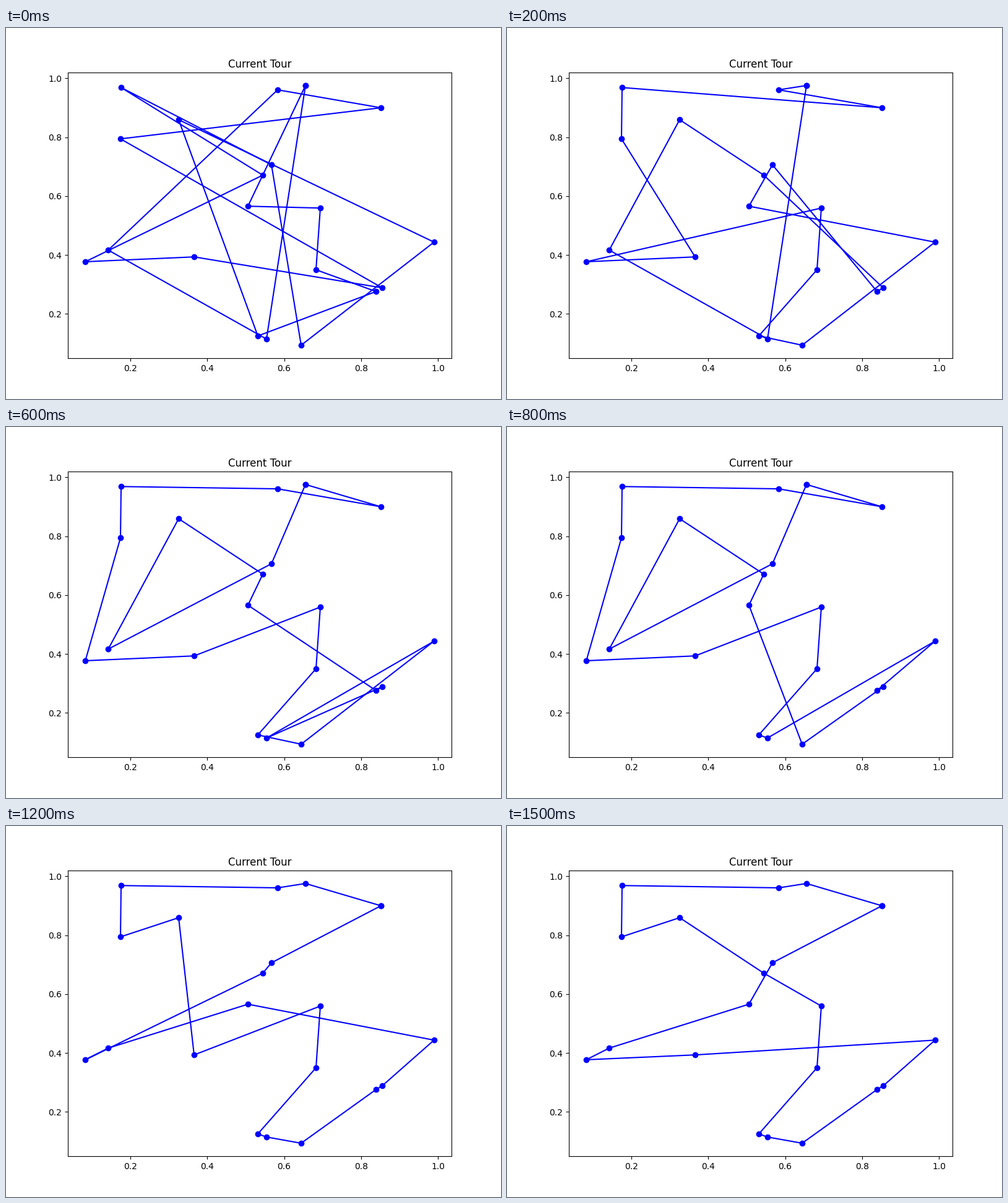
Write a matplotlib script that moves like this. It is 800 px wide and 600 px high and loops after 1.6 s.

```python
import numpy as np
import matplotlib.pyplot as plt
from matplotlib.animation import FuncAnimation

W, H, DPI = 800, 600, 100
XLIM = (0.0370, 1.0354)
YLIM = (0.0497, 1.0197)

# City positions in stage pixels, y downwards
CITIES = {
    "A": (186, 96.3), "B": (185, 179.3), "C": (279, 148.3), "D": (439, 100),
    "E": (484, 93), "F": (606, 129), "G": (429, 221.2), "H": (415, 238),
    "I": (391, 288.2), "J": (508, 291.2), "K": (165.2, 359.2),
    "L": (128.2, 378), "M": (304, 370.2), "N": (501, 391), "O": (691.8, 346.3),
    "P": (608, 420.2), "Q": (598, 426.2), "R": (407, 498), "S": (421, 503),
    "T": (477, 513),
}
START = "ESKDFBPMLHAGTOCRQNJI"
# City pairs exchanged at each step; many while hot, one when cooled
STEPS = [
    "DC FH BP BQ MG LI", "FO AT MR AN FJ DL", "DF PG", "SI", "IG", "LM",
    "QT", "SQ", "TO", "CL", "KH", "FE", "IM", "HI", "LK",
]


def swap(tour, pair):
    a, b = pair
    return tour.translate(str.maketrans(a + b, b + a))


def build_tours():
    tours = [START]
    for step in STEPS:
        tour = tours[-1]
        for pair in step.split():
            tour = swap(tour, pair)
        tours.append(tour)
    return tours


def to_data(px, py, box):
    x = np.interp(px, (box.x0 * W, box.x1 * W), XLIM)
    y = np.interp(H - py, (box.y0 * H, box.y1 * H), YLIM)
    return x, y


fig, ax = plt.subplots(figsize=(W / DPI, H / DPI), dpi=DPI)
ax.set(xlim=XLIM, ylim=YLIM, title="Current Tour")
ax.set_xticks([0.2, 0.4, 0.6, 0.8, 1.0])
ax.set_yticks([0.2, 0.4, 0.6, 0.8, 1.0])
route, = ax.plot([], [], "bo-")
tours = build_tours()


def update(i):
    tour = tours[i]
    px, py = np.array([CITIES[c] for c in tour + tour[0]]).T
    route.set_data(*to_data(px, py, ax.get_position()))
    return route,


anim = FuncAnimation(fig, update, frames=len(tours), interval=100,
                     repeat=True, repeat_delay=0)
plt.show()
```
